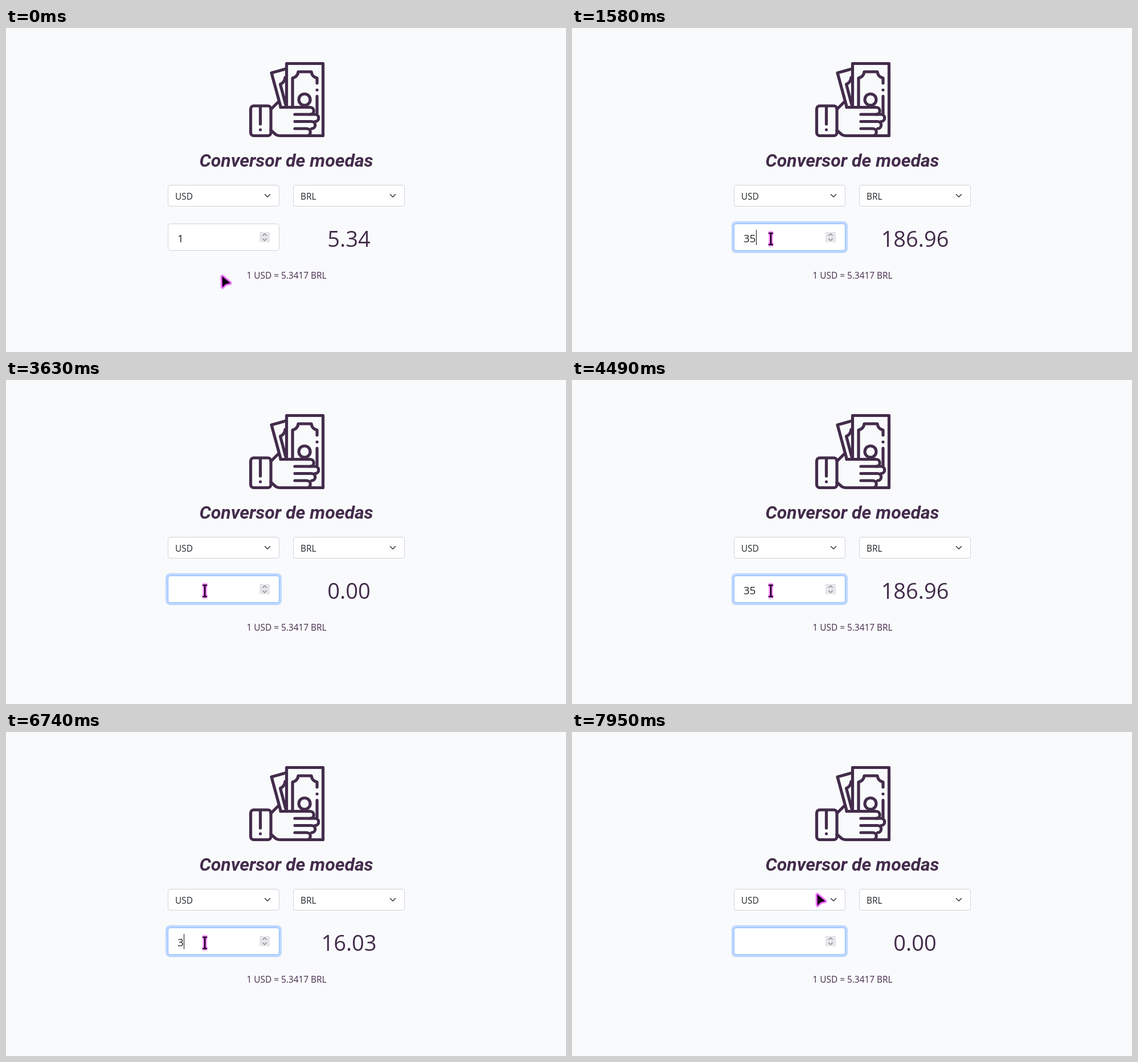
Recreate the animation shown at these times as an HTML page. Size 983 by 570 pixels, loop 8000 ms.

```html
<!DOCTYPE html>
<html lang="pt-BR">
<head>
<meta charset="utf-8">
<title>Conversor de moedas</title>
<style>
  html, body { margin: 0; width: 100%; height: 100%; overflow: hidden; background: #f9fafc; }
  svg { display: block; width: 983px; height: 570px; }
  text { font-family: "Open Sans", "Noto Sans", sans-serif; font-size: 15.4px; fill: #212529; }
  .purple { fill: #432c4b; }
  .title { font: italic 700 32px Roboto, sans-serif; }
  .icon { fill: none; stroke: #432c4b; stroke-width: 5.2; stroke-linecap: round; stroke-linejoin: round; }
  .box { fill: #fff; stroke: #ced4da; }
  .chevron { fill: none; stroke: #343a40; stroke-width: 1.6; stroke-linecap: round; stroke-linejoin: round; }
  .spin { fill: none; stroke: #85858a; stroke-width: 1.3; }
  .glow { fill: none; stroke: #e33cf5; stroke-linejoin: round; }
  #amount { font-size: 18.85px; }
  #result { font-size: 38px; }
</style>
</head>
<body>
<svg viewBox="0 0 983 570">
  <defs>
    <filter id="soft" x="-60%" y="-60%" width="220%" height="220%"><feGaussianBlur stdDeviation="0.9"/></filter>
    <radialGradient id="press">
      <stop offset="0" stop-color="#ffb03c"/>
      <stop offset=".55" stop-color="#fde95c"/>
      <stop offset=".85" stop-color="#fdf27c"/>
      <stop offset="1" stop-color="#fdf27c" stop-opacity="0"/>
    </radialGradient>
    <path id="arrowShape" d="M0 0 L14 11.8 L6.3 13.2 L.5 19Z"/>
    <path id="beamShape" d="M-4 -10H4M-4 10H4M0 -10V10"/>
  </defs>

  <g class="icon">
    <!-- back note -->
    <path d="M491 72 L466 79 L482 138"/>
    <path d="M490 87 Q489 96 481.500 99 L491 135"/>
    <!-- front note -->
    <path d="M492.500 138V62.500H556.500V189.500H530"/>
    <path d="M503 138V88Q512 86 513 77H536Q537 86 546 88V97M546 120V151"/>
    <circle cx="524" cy="126" r="10"/>
    <path d="M546 109h.01"/>
    <!-- cuff -->
    <rect x="429.500" y="137" width="35.500" height="52.500" rx="5.500"/>
    <path d="M446.500 139V169M446.500 179h.01"/>
    <!-- hand -->
    <path d="M465 143 L479 129M482 139.500H534a6.250 6.250 0 0 1 0 12.500"/>
    <path d="M507 152H542.500a6.250 6.250 0 0 1 0 12.500M507 164.500H536.500a6.250 6.250 0 0 1 0 12.500"/>
    <path d="M507 177H528a6.250 6.250 0 0 1 0 12.500H480Q476 189.500 473 187L465 180"/>
  </g>

  <text class="title purple" x="492" y="244" text-anchor="middle">Conversor de moedas</text>

  <rect class="box" x="284.500" y="276.500" width="195" height="37" rx="3.500"/>
  <rect class="box" x="504.500" y="276.500" width="195" height="37" rx="3.500"/>
  <text x="297" y="302">USD</text>
  <text x="517" y="302">BRL</text>
  <path class="chevron" d="M454.500 292.800l4.500 4.500l4.500 -4.500M674.500 292.800l4.500 4.500l4.500 -4.500"/>

  <rect id="ring" x="280" y="340" width="204" height="56" rx="8" fill="#bed7fe"/>
  <rect id="field" class="box" x="284.500" y="344.500" width="195" height="47" rx="4.300"/>
  <rect x="445" y="359" width="18" height="18" fill="#e6e6ea"/>
  <path class="spin" d="M450.500 365.500l3.500 -3.500l3.500 3.500M450.500 370.500l3.500 3.500l3.500 -3.500"/>
  <text id="amount" x="301" y="377"></text>
  <rect id="caret" y="355" width="1" height="27" fill="#111"/>

  <text id="result" class="purple" x="602" y="385" text-anchor="middle"></text>
  <text class="purple" x="492.500" y="441" text-anchor="middle">1 USD = 5.3417 BRL</text>

  <g id="pointer">
    <circle id="click" r="12.500" fill="url(#press)"/>
    <g id="arrow">
      <use href="#arrowShape" class="glow" stroke-width="5" filter="url(#soft)"/>
      <use href="#arrowShape" fill="#0b000d"/>
    </g>
    <g id="beam">
      <use id="beamGlow" href="#beamShape" class="glow" stroke-width="5.500" filter="url(#soft)"/>
      <use id="beamCore" href="#beamShape" fill="none" stroke-width="2.200"/>
    </g>
  </g>
</svg>
<script>
const LOOP = 8000, FOCUS = 560, LEAVE = 7610;
const el = id => document.getElementById(id);
const show = (id, on) => el(id).setAttribute('visibility', on ? 'visible' : 'hidden');
const lerp = (a, b, k) => a.map((v, i) => v + (b[i] - v) * k);

// [time, typed amount, converted amount, caret visible]
const states = [
  [0, '1', '5.34', 0], [FOCUS, '1', '5.34', 1], [890, '', '0.00', 1],
  [1030, '3', '0.00', 1], [1100, '3', '16.03', 1],
  [1520, '35', '16.03', 1], [1580, '35', '186.96', 1],
  [2050, '35', '186.96', 0], [2570, '35', '186.96', 1],
  [2840, '3', '16.03', 1], [3040, '', '16.03', 1], [3100, '', '0.00', 1],
  [3630, '', '0.00', 0], [3830, '3', '0.00', 0], [3960, '3', '16.03', 0],
  [4360, '35', '16.03', 0], [4490, '35', '186.96', 0],
  [4890, '350', '186.96', 1], [5020, '350', '1869.60', 1],
  [5550, '350', '1869.60', 0], [6070, '350', '1869.60', 1],
  [6470, '35', '1869.60', 1], [6600, '35', '186.96', 1],
  [6740, '3', '16.03', 1], [7020, '', '16.03', 1], [7150, '', '0.00', 1],
  [LEAVE, '', '0.00', 0]
];

const START = [379.5, 437], PRESS = [346, 380.5], REST = [349, 371], END = [430.5, 286];

function pointerAt(t) {
  if (t < 700) {
    const k = Math.min(1, Math.floor(t / 70) / 8);
    return lerp(START, PRESS, k * k * (3 - 2 * k));
  }
  if (t < LEAVE) return REST;
  return lerp(REST, END, Math.min(5, Math.floor((t - LEAVE) / 85) + 1) / 5);
}

function draw(t) {
  const [, amount, result, caret] = states.findLast(s => s[0] <= t);
  el('amount').textContent = amount;
  el('result').textContent = result;
  el('caret').setAttribute('x', 301 + Math.round(amount.length * 10.78));
  show('caret', caret);

  const focused = t >= FOCUS;
  show('ring', focused);
  el('field').style.stroke = focused ? '#86b7fe' : '';

  const [x, y] = pointerAt(t);
  const inField = y > 344 && y < 392;
  const pressed = t >= FOCUS && t < 700;
  el('pointer').setAttribute('transform', `translate(${x} ${y})`);
  show('arrow', !inField);
  show('beam', inField);
  show('click', pressed);
  el('beamGlow').style.stroke = pressed ? '#e8854a' : '';
  el('beamCore').style.stroke = pressed ? '#6b2a25' : '#0b000d';
}

const begin = performance.now();
function tick() {
  draw((performance.now() - begin) % LOOP);
  requestAnimationFrame(tick);
}
tick();
</script>
</body>
</html>
```
